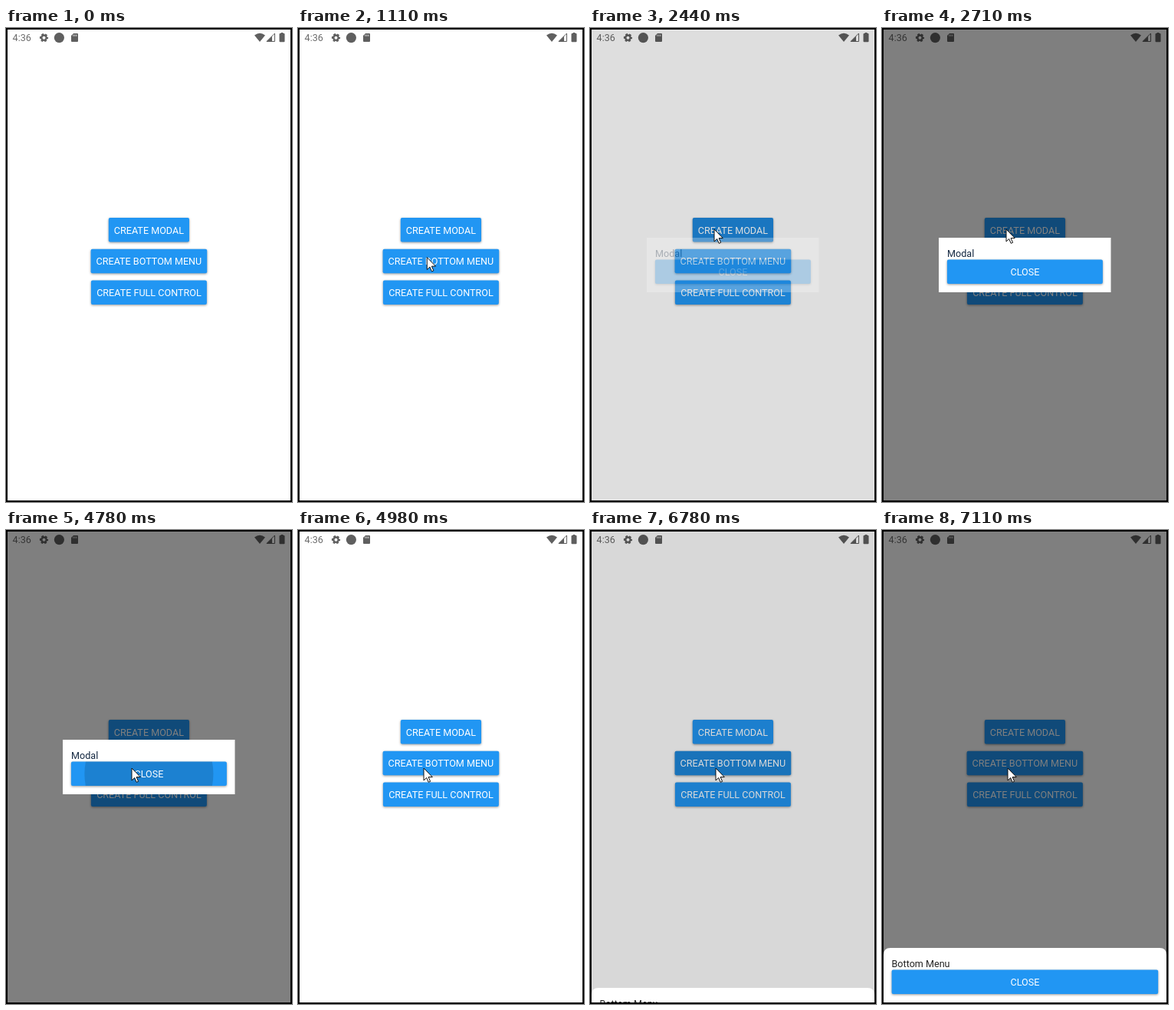
These frames come from a looping animation (373 px wide and 617 px high, 8 s). An HTML page:

```html
<!DOCTYPE html>
<html lang="en">
<head>
<meta charset="utf-8">
<title>Modal demo</title>
<style>
  html, body { margin: 0; width: 100%; height: 100%; overflow: hidden; background: #fff; }
  svg { display: block; width: 373px; height: 617px; }
  text { font: 12.6px Roboto, sans-serif; }
  .button rect { fill: #2196f3; filter: drop-shadow(0 1px 1.4px rgba(0, 0, 0, .4)); }
  .button text { fill: #fff; text-anchor: middle; }
  .status { fill: #5f5f5f; }
</style>
</head>
<body>
<svg viewBox="0 0 373 617">
  <defs id="clips"></defs>
  <rect width="373" height="617" fill="#fff"/>

  <g class="status">
    <text x="8.6" y="17.3" fill="#6c6c6c">4:36</text>
    <g fill="none" stroke="#5f5f5f">
      <circle cx="49.5" cy="12.7" r="3.2" stroke-width="2.4"/>
      <circle cx="49.5" cy="12.7" r="4.6" stroke-width="2" stroke-dasharray="2.8 2.017" stroke-dashoffset="1.4"/>
    </g>
    <circle cx="69.4" cy="12.6" r="6.6"/>
    <path d="M88 7h5q1 0 1 1v9q0 1-1 1h-7q-1 0-1-1v-7z"/>
    <path d="M87.8 8.6v2.2M89.8 8.6v2.2M91.8 8.6v2.2" stroke="#fff" stroke-width=".8"/>
    <path d="M324 9.6Q331 4 338 9.6L331 18z"/>
    <path d="M350.5 7v10.5H340z" fill="none" stroke="#5f5f5f"/>
    <path d="M347 10.5v7h-7z"/>
    <path d="M358.5 7v-1h3v1h1q1 0 1 1v9.3q0 1-1 1h-5q-1 0-1-1V8q0-1 1-1z"/>
  </g>

  <g id="page"></g>
  <rect id="backdrop" width="373" height="617"/>

  <g id="modal">
    <rect x="74" y="273" width="224.5" height="71" fill="#fff"/>
    <text x="85" y="297.5" fill="#12263f">Modal</text>
  </g>

  <g id="sheet">
    <path d="M2 617V553q0-9 9-9h351q9 0 9 9v64z" fill="#fff"/>
    <text x="12.5" y="568.7" fill="#222">Bottom Menu</text>
  </g>

  <path id="cursor" d="M0 0V16L3.7 12.5 6.2 18.3 8.6 17.3 6.1 11.6H11.3Z"
        fill="#fff" stroke="#111" stroke-linejoin="round"/>
  <circle id="press" r="12" fill="#ffff14" fill-opacity=".52"/>
  <rect x="1" y="1" width="371" height="615" fill="none" stroke="#000" stroke-width="2"/>
</svg>

<script>
const LOOP = 8000, STEP = 1000 / 15, OFFSET = 40;
const CENTER = 186.4;
const ENTER = 9, OPEN_MODAL = 33, CLOSE_MODAL = 69, OPEN_MENU = 98;
const $ = id => document.getElementById(id);

const mix = (a, b, p) => a + (b - a) * p;
const span = (now, from, to) => Math.min(1, Math.max(0, (now - from) / (to - from)));
const smooth = p => p * p * (3 - 2 * p);
const easeOut = p => 1 - (1 - p) ** 2;

function set(el, attrs) {
  for (const name in attrs) el.setAttribute(name, attrs[name]);
}

function make(tag, attrs, parent) {
  const el = document.createElementNS('http://www.w3.org/2000/svg', tag);
  set(el, attrs);
  return parent.appendChild(el);
}

// Builds a centred button and returns its touch ripple.
function button(parent, label, y, width) {
  const box = { x: CENTER - width / 2, y, width, height: 31.5, rx: 2 };
  const id = 'clip-' + y;
  const group = make('g', { class: 'button' }, parent);
  make('rect', box, make('clipPath', { id }, $('clips')));
  make('rect', box, group);
  const clipped = make('g', { 'clip-path': `url(#${id})` }, group);
  const ripple = make('circle', { cy: y + 16, r: 0 }, clipped);
  make('text', { x: CENTER, y: y + 20.6 }, group).textContent = label;
  return ripple;
}

const rowTop = row => 247 + row * 40.7;
const taps = [
  { at: OPEN_MODAL, ripple: button($('page'), 'CREATE MODAL', rowTop(0), 105.2) },
  { at: OPEN_MENU, ripple: button($('page'), 'CREATE BOTTOM MENU', rowTop(1), 151.6) },
  { at: CLOSE_MODAL, ripple: button($('modal'), 'CLOSE', 301.5, 203) }
];
button($('page'), 'CREATE FULL CONTROL', rowTop(2), 151);
button($('sheet'), 'CLOSE', 572.6, 347.5);

// A curved approach, a small nudge, then a move down to the close button.
function cursorAt(step) {
  const left = 1 - span(step, ENTER, 18);
  const nudge = span(step, 20, 22);
  const down = smooth(span(step, 62, 66));
  return [
    160 + 167 * left ** 2 + 2 * nudge + 2 * down,
    269 + 328 * left ** 1.6 - 7 * nudge + 48 * down
  ];
}

function draw(time) {
  const step = Math.floor((time - OFFSET + .5) / STEP);
  const [x, y] = cursorAt(step);
  const modal = smooth(span(step, OPEN_MODAL + 1, OPEN_MODAL + 7))
    * (1 - span(step, CLOSE_MODAL + 2, CLOSE_MODAL + 5));
  const sheet = easeOut(span(step, OPEN_MENU + 2, OPEN_MENU + 8));
  const pressed = taps.some(({ at }) => step >= at && step < at + 2);

  set($('cursor'), { transform: `translate(${x} ${y})`, opacity: step < ENTER ? 0 : 1 });
  set($('press'), { cx: x - 1, cy: y - .5, opacity: pressed ? 1 : 0 });
  set($('modal'), { opacity: modal });
  set($('sheet'), { transform: `translate(0 ${(1 - sheet) * 75})` });
  set($('backdrop'), { opacity: Math.max(modal, sheet) * .5 });

  for (const { at, ripple } of taps) {
    const age = step - at;
    const grow = span(age, 0, 2);
    set(ripple, {
      cx: mix(x, CENTER, grow),
      r: 84 * grow,
      opacity: .14 * grow * (1 - span(age, 2, 5))
    });
  }
}

const start = performance.now();
function tick() {
  draw((performance.now() - start) % LOOP);
  requestAnimationFrame(tick);
}
tick();
</script>
</body>
</html>
```
